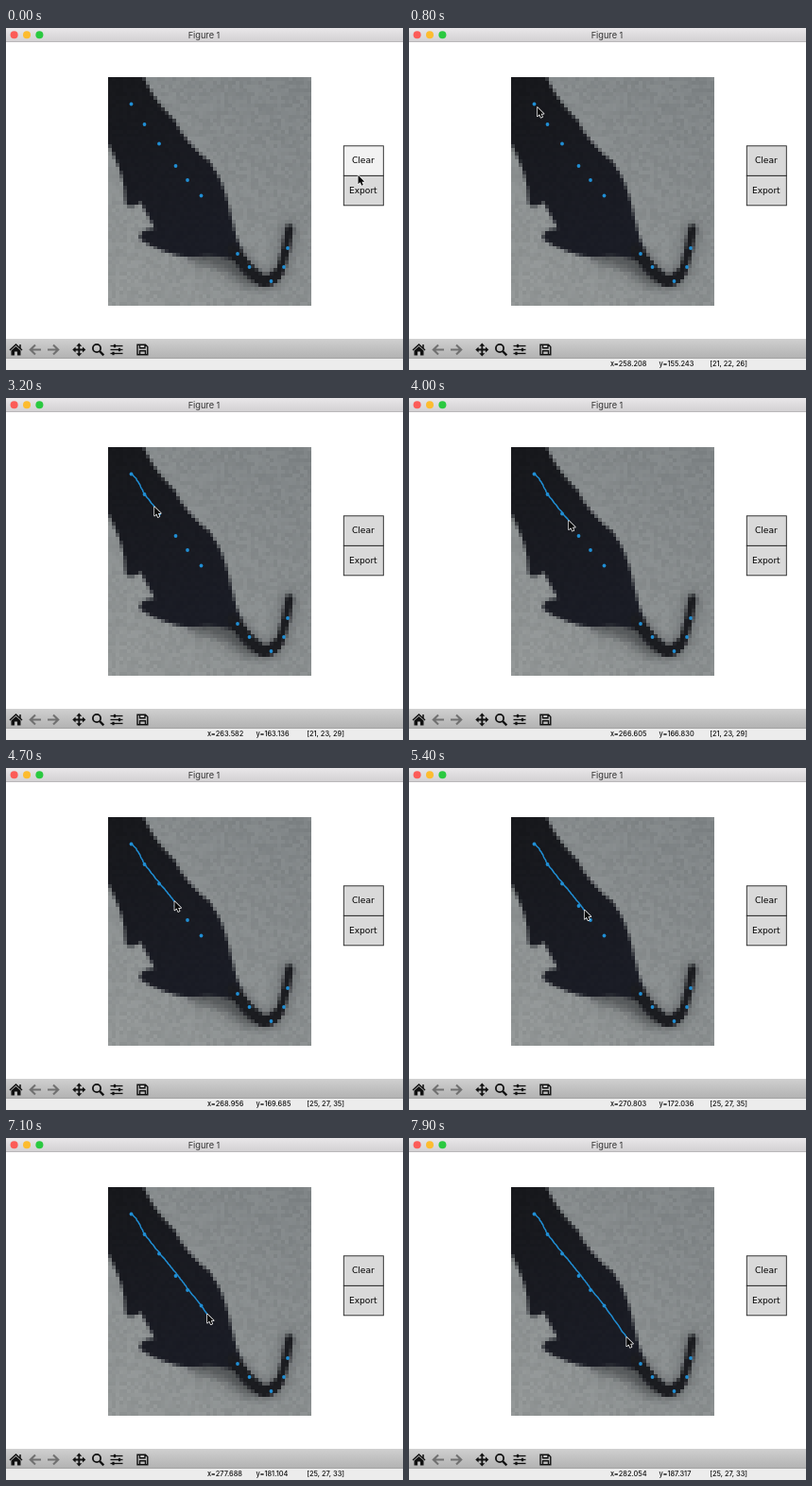
Recreate the animation shown at these times as an HTML page with a canvas. Size 420 by 362 pixels, loop 8 s.

```html
<!DOCTYPE html>
<html lang="en">
<head>
<meta charset="utf-8">
<title>Figure 1</title>
<style>
html, body { margin: 0; width: 100%; height: 100%; overflow: hidden; background: #fff; }
canvas { display: block; }
</style>
</head>
<body>
<canvas id="stage" width="420" height="362"></canvas>
<script>
const ctx = document.getElementById('stage').getContext('2d');
const LOOP = 8000, TICK = 100, ARRIVE = 800, DRAG_START = 1100;
const BLUE = '#208ed4';
const PIC = { x: 108, y: 52, w: 215, h: 242, cols: 54, rows: 61 };
// One pointer step in stage pixels and in data units, with the point they count from
const STEP = 0.665, UNIT = 0.16793, BASE = { px: 135.8, py: 84, x: 258.208, y: 155.2428 };

// Pointer path after it arrives: time, steps across, steps down
const keys = [
  [800, 0, 0], [1100, -5, -6], [1800, 6, 7], [2500, 16, 26], [3200, 32, 47],
  [4700, 64, 86], [6200, 87, 116], [6800, 106, 140], [7900, 142, 191]
];
const dots = [
  [132.5, 80.5], [146.5, 102], [162, 122.5], [179.5, 146], [192, 161], [206.5, 177.5],
  [245, 239], [257.5, 253], [280.5, 268], [294, 253], [298, 233]
];
// Colours read under the pointer, from the top of the back downwards
const shades = ['[21, 22, 26]', '[21, 23, 29]', '[25, 27, 35]', '[25, 27, 33]'];

function fill(path, color, c = ctx) {
  c.fillStyle = color;
  c.fill(new Path2D(path));
}
function stroke(path, color, width, c = ctx) {
  c.strokeStyle = color;
  c.lineWidth = width;
  c.stroke(new Path2D(path));
}
function disc(x, y, r, color) {
  ctx.fillStyle = color;
  ctx.beginPath();
  ctx.arc(x, y, r, 0, 7);
  ctx.fill();
}
function rect(x, y, w, h, color, c = ctx) {
  c.fillStyle = color;
  c.fillRect(x, y, w, h);
}
function text(str, x, y, font, color, align = 'left') {
  ctx.font = font;
  ctx.fillStyle = color;
  ctx.textAlign = align;
  ctx.fillText(str, x, y);
}
function gradient(c, x0, y0, x1, y1, from, to) {
  const g = c.createLinearGradient(x0, y0, x1, y1);
  g.addColorStop(0, from);
  g.addColorStop(1, to);
  return g;
}

// Coarse picture: an animal silhouette on a grainy floor
function makePicture() {
  const cv = document.createElement('canvas');
  cv.width = PIC.cols;
  cv.height = PIC.rows;
  const c = cv.getContext('2d', { willReadFrequently: true });
  c.scale(PIC.cols / PIC.w, PIC.rows / PIC.h);
  c.translate(-PIC.x, -PIC.y);
  rect(100, 45, 230, 255, gradient(c, 310, 60, 120, 290, '#7f8486', '#929696'), c);
  c.lineJoin = c.lineCap = 'round';

  const back = 'M100 45H143C154 74 166 84 178 97C190 122 202 132 216 142C240 172 236 208 250 234';
  const belly = 'L242 246Q215 238 195 243Q168 242 142 224Q138 214 157 212L142 184' +
    'Q139 190 128 188C123 172 132 168 104 114Z';
  const tail = 'M244 238Q258 260 270 267Q282 272 290 258Q296 240 300 212';

  c.filter = 'blur(1.6px)';
  stroke('M200 240Q232 242 258 266', 'rgba(45,47,50,.7)', 15, c);
  stroke(tail, 'rgba(60,62,65,.5)', 13, c);
  c.filter = 'blur(.5px)';
  fill(back + belly, gradient(c, 130, 60, 200, 230, '#17181c', '#1a1c25'), c);
  stroke('M240 234Q255 258 270 267Q280 270 286 262', '#1b1c20', 12, c);
  stroke(tail, '#1b1c20', 8.5, c);

  const img = c.getImageData(0, 0, PIC.cols, PIC.rows), d = img.data;
  let seed = 7;
  for (let i = 0; i < d.length; i += 4) {
    seed = (seed * 16807) % 2147483647;
    const n = (seed / 2147483647 - 0.5) * (d[i] > 90 ? 11 : 3);
    for (let k = 0; k < 3; k++) d[i + k] += n;
  }
  c.putImageData(img, 0, 0);
  return { cv, c };
}
const picture = makePicture();

// Smooth curve through the keys; k picks the coordinate
function along(t, k) {
  const last = keys.length - 1;
  let i = 0;
  while (i < last - 1 && keys[i + 1][0] < t) i++;
  const slope = n => {
    const a = keys[Math.max(0, n - 1)], b = keys[Math.min(last, n + 1)];
    return (b[k] - a[k]) / (b[0] - a[0]);
  };
  const p = keys[i], q = keys[i + 1], dt = q[0] - p[0];
  const f = Math.min(1, (t - p[0]) / dt), g = 1 - f;
  return g * g * (1 + 2 * f) * p[k] + f * f * (1 + 2 * g) * q[k] +
    f * g * dt * (g * slope(i) - f * slope(i + 1));
}

function pointerAt(t) {
  const left = Math.max(0, 1 - t / ARRIVE) ** 3;
  const u = Math.round(left ? 356 * left : along(t, 1));
  const v = Math.round(left ? 108 * left : along(t, 2));
  return { u, v, x: BASE.px + u * STEP, y: BASE.py + v * STEP };
}

function colorUnder(p) {
  const col = Math.floor((p.x - PIC.x) / PIC.w * PIC.cols);
  const row = Math.floor((p.y - PIC.y) / PIC.h * PIC.rows);
  const rgb = [...picture.c.getImageData(col, row, 1, 1).data].slice(0, 3);
  if (rgb[0] > 60) return '[' + rgb.join(', ') + ']';
  return shades[Math.max(0, Math.min(3, Math.floor(p.v / 42)))];
}

function drawWindow() {
  rect(0, 0, 420, 362, '#fff');
  rect(0, 0, 420, 14, gradient(ctx, 0, 0, 0, 14, '#e9e7e9', '#d3d1d3'));
  rect(0, 14, 420, 1, '#b9b7b9');
  ['#fc5b57', '#fdbc2f', '#2ac940'].forEach((color, i) => disc(8.6 + i * 13.4, 7.2, 4, color));
  text('Figure 1', 209.5, 10.6, '9.2px Inter, sans-serif', '#333', 'center');
}

function drawToolbar() {
  rect(0, 329, 420, 21, gradient(ctx, 0, 329, 0, 350, '#d0d0d0', '#b1b1b1'));
  rect(0, 349, 420, 1, '#a2a2a2');
  rect(0, 350, 420, 12, '#ececec');
  const ink = '#111', faded = '#707070';
  ctx.lineCap = 'butt';
  ctx.lineJoin = 'miter';
  // home
  fill('M10.5 337L15.5 341.5V346.5H12V342.5H9V346.5H5.5V341.5Z', ink);
  stroke('M4 341L10.5 335L17 341M15 335V339', ink, 1.5);
  // back, forward
  stroke('M37 340.5H26M31 335.5L25.8 340.5L31 345.5', faded, 2.1);
  stroke('M44 340.5H55M50 335.5L55.2 340.5L50 345.5', faded, 2.1);
  // pan: one arrow, turned four times
  for (let i = 0; i < 4; i++) {
    ctx.save();
    ctx.translate(77.3, 340.5);
    ctx.rotate(i * Math.PI / 2);
    fill('M0 -7L3 -3.7H.9V0H-.9V-3.7H-3Z', ink);
    ctx.restore();
  }
  // zoom
  stroke('M91.9 339a4.1 4.1 0 1 0 8.2 0a4.1 4.1 0 1 0 -8.2 0', ink, 1.8);
  stroke('M99 342L103.3 346.3', ink, 2.4);
  // sliders
  [115, 120, 113.5].forEach((x, i) => {
    const y = 336.5 + i * 4;
    stroke(`M110.5 ${y}h13`, ink, 1.3);
    stroke(`M${x} ${y - 1.7}v3.4`, ink, 2.2);
  });
  // save
  stroke('M139 335.2H147.5L149.8 337.5V345.8H139ZM141.5 335V338.8H147V335M141.5 346V341.8H147.5V346', ink, 1.4);
}

function drawButton(label, y, hovered) {
  rect(357.3, y, 42, 31.5, hovered ? '#f2f2f2' : '#d9d9d9');
  ctx.strokeStyle = '#222';
  ctx.lineWidth = 0.9;
  ctx.strokeRect(357.3, y, 42, 31.5);
  text(label, 377.8, y + 18.3, '9.1px "DejaVu Sans", sans-serif', '#000', 'center');
}

function drawTrail(t) {
  if (t <= DRAG_START) return;
  ctx.beginPath();
  for (let s = DRAG_START; s <= t; s += TICK) {
    const p = pointerAt(s);
    ctx.lineTo(p.x, p.y);
  }
  ctx.lineJoin = ctx.lineCap = 'round';
  ctx.strokeStyle = BLUE;
  ctx.lineWidth = 1.5;
  ctx.stroke();
}

function drawStatus(p) {
  if (p.x > PIC.x + PIC.w) return;
  const show = (str, x, align) =>
    text(str, x, 358.4, '500 7.4px Inter, "Liberation Sans", sans-serif', '#111', align);
  show('x=' + (BASE.x + p.u * UNIT).toFixed(3), 213);
  show('y=' + (BASE.y + p.v * UNIT).toFixed(3), 264.5);
  show(colorUnder(p), 358, 'right');
}

function drawPointer(p) {
  ctx.save();
  ctx.translate(p.x, p.y);
  ctx.scale(0.92, 0.92);
  ctx.lineJoin = 'round';
  const arrow = 'M0 0V10.2L2.4 8L4 11.8L5.8 11L4.2 7.4H7.4Z';
  stroke(arrow, '#fff', 1.5);
  fill(arrow, '#080808');
  ctx.restore();
}

function draw(now) {
  const t = Math.floor(now % LOOP / TICK) * TICK;
  const p = pointerAt(t);
  drawWindow();
  ctx.imageSmoothingEnabled = false;
  ctx.drawImage(picture.cv, PIC.x, PIC.y, PIC.w, PIC.h);
  const overButtons = p.x > 357;
  drawButton('Export', 156.3, overButtons && p.y > 156.3);
  drawButton('Clear', 124.8, overButtons && p.y <= 156.3);
  dots.forEach(([x, y]) => disc(x, y, 1.9, BLUE));
  drawTrail(t);
  drawToolbar();
  drawStatus(p);
  drawPointer(p);
}

const start = performance.now();
function frame() {
  draw(performance.now() - start);
  requestAnimationFrame(frame);
}
frame();
</script>
</body>
</html>
```
